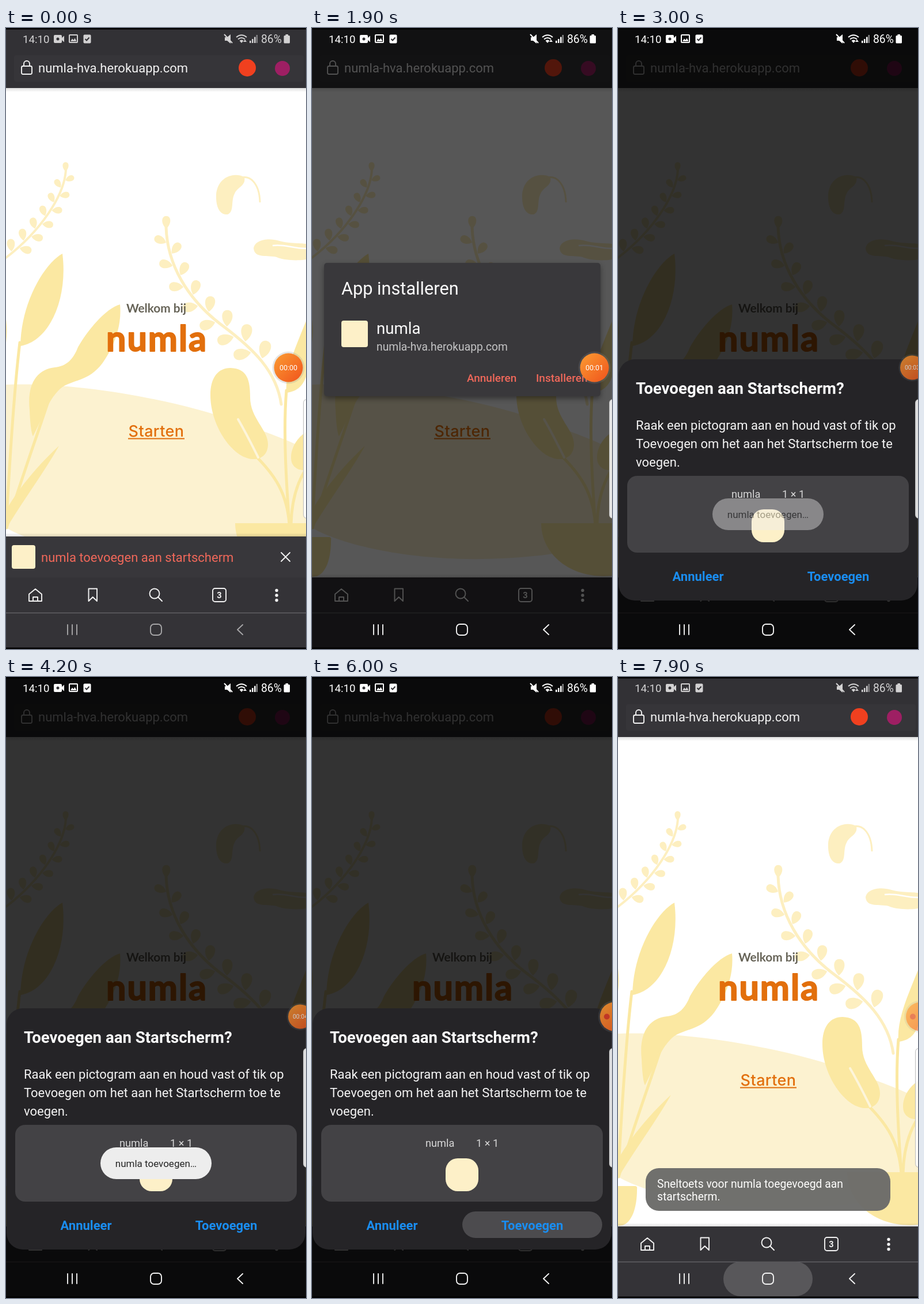
These frames come from a looping animation (521x1076 px, 8 s). An HTML page:

```html
<!DOCTYPE html>
<html lang="nl">
<head>
<meta charset="utf-8">
<title>App toevoegen</title>
<style>
  html, body { margin: 0; width: 100%; height: 100%; overflow: hidden; background: #000; }
  svg { display: block; width: 100%; height: 100%; }
  text { font-family: Roboto, Inter, sans-serif; white-space: pre; }
  .round { font-family: Lato, "Open Sans", sans-serif; }
  .plain { font-family: Inter, sans-serif; }
  .mid { text-anchor: middle; }
  .line { fill: none; stroke: #f2f2f2; stroke-width: 1.9; stroke-linejoin: round; stroke-linecap: round; }
  .stem { fill: none; stroke: #fbe8a2; stroke-linecap: round; stroke-width: 5; }
  .sprig { fill: none; stroke: #fdefc0; stroke-linecap: round; }
  #dialog > rect:first-child { filter: drop-shadow(0 4px 5px #0006); }
</style>
</head>
<body>
<svg viewBox="0 0 521 1076" preserveAspectRatio="none">
  <defs>
    <linearGradient id="orange" x1="0" y1="0" x2="1" y2="1">
      <stop offset="0" stop-color="#fb9c32"/><stop offset="1" stop-color="#f0531c"/>
    </linearGradient>
    <linearGradient id="shade" x1="0" y1="0" x2="0" y2="1">
      <stop offset="0" stop-color="#000" stop-opacity=".13"/><stop offset="1" stop-color="#000" stop-opacity="0"/>
    </linearGradient>
    <clipPath id="view"><rect y="104" width="521" height="848"/></clipPath>
  </defs>

  <g clip-path="url(#view)">
    <rect y="104" width="521" height="848" fill="#fff"/>
    <path fill="#fcf2d0" d="M0 618C130 613 300 646 400 682C450 699 490 714 521 730V880C480 904 420 914 330 919C190 926 60 900 0 866Z"/>
    <g fill="#fdefc0">
      <g id="leaflets"></g>
      <path id="leftSprig" class="sprig" stroke-width="4" d="M104 245C102 290 60 352 0 398"/>
      <path id="rightSprig" class="sprig" stroke-width="5" d="M278 345C280 410 315 470 375 515C430 556 470 595 478 652"/>
      <path d="M414 258C395 249 368 258 365 288C364 315 374 324 385 323C397 318 390 300 397 287C402 275 417 274 414 258Z"/>
      <path class="sprig" stroke-width="3" d="M402 262C425 250 440 272 441 301"/>
      <path d="M430 382C432 367 455 363 475 369C495 374 505 372 521 374V401C505 404 480 402 470 397C455 393 432 400 430 382Z"/>
      <path fill="none" stroke="#fff" stroke-width="2.5" d="M463 377C485 374 495 382 521 382"/>
    </g>
    <g fill="#fbe8a2">
      <path d="M98 391C68 407 26 474 25 551C75 543 108 470 98 391Z"/>
      <path d="M198 479C178 484 147 515 125 553C117 574 105 586 85 588C55 591 36 615 41 662C42 690 45 705 47 707C62 680 74 640 98 622C120 608 148 612 172 574C192 543 201 510 198 479Z"/>
      <path d="M92 724C55 758 20 800 0 836V868C30 818 66 770 92 724Z"/>
      <path d="M0 505Q3 525 0 545Z"/>
      <path d="M390 589C419 590 424 610 424 640C424 676 455 696 455 721C455 740 442 748 428 747C394 745 355 690 355 636C355 606 368 589 390 589Z"/>
      <path d="M521 508C505 548 484 592 487 632C505 630 516 620 521 604Z"/>
      <path d="M521 700C500 714 492 736 496 752C500 765 515 768 521 765Z"/>
      <path class="stem" d="M24 545C15 620 8 720 1 850M74 645C52 712 20 800 1 866"/>
      <path class="stem" d="M438 746C466 775 488 805 492 860M487 628C481 700 487 790 492 860M521 764C504 790 496 820 495 860"/>
      <path fill="none" stroke="#fdf5da" stroke-width="4" stroke-linecap="round" d="M403 678C416 700 428 724 438 744"/>
      <path d="M0 882H30Q34 882 33 888C33 920 24 945 8 950L0 951Z"/>
      <path d="M398 858H521V949C450 956 398 912 398 858Z"/>
    </g>
    <text class="round mid" x="261" y="493" font-size="20.8" font-weight="700" fill="#676458">Welkom bij</text>
    <text class="round mid" x="262" y="560" font-size="61" font-weight="700" letter-spacing="2" fill="#e26f0c" stroke="#e26f0c" stroke-width="2" stroke-linejoin="round">numla</text>
    <text class="plain mid" x="261" y="708" font-size="27" font-weight="500" letter-spacing=".4" fill="#e26f0c">Starten</text>
    <path stroke="#e26f0c" stroke-width="2" d="M212 711.5H310"/>
    <rect y="104" width="521" height="7" fill="url(#shade)"/>
    <rect y="-952" width="521" height="6" fill="url(#shade)" transform="scale(1 -1)"/>
    <g id="banner">
      <rect y="-881" width="521" height="6" fill="url(#shade)" transform="scale(1 -1)"/>
      <rect y="881" width="521" height="75" fill="#38373b"/>
      <rect x="10" y="896" width="41" height="41" rx="4" fill="#fdf0c8"/>
      <text x="61" y="925" font-size="22" fill="#f0685a">numla toevoegen aan startscherm</text>
      <path class="line" d="M478 909L493 924M493 909L478 924"/>
    </g>
  </g>

  <rect width="521" height="104" fill="#323135"/>
  <rect x="14" y="47" width="503" height="46" rx="4" fill="#363539"/>
  <rect y="952" width="521" height="124" fill="#343337"/>
  <path stroke="#626165" stroke-width="1.5" d="M0 1013.5H521"/>
  <rect x="27" y="66" width="18" height="14" rx="2.5" class="line"/>
  <path class="line" d="M31 66V62A5 5 0 0 1 41 62V66"/>
  <text x="56" y="77" font-size="22" fill="#f2f2f2">numla-hva.herokuapp.com</text>
  <circle cx="419" cy="69" r="15" fill="#f0401f"/>
  <circle cx="480" cy="70" r="13" fill="#9e1f63"/>
  <path class="line" d="M40 981L51 972L62 981V993H40ZM47 993V986H55V993M143.5 971.5H158V993L150.7 986L143.5 993ZM264 986L271 993"/>
  <circle cx="258" cy="980" r="8.5" class="line"/>
  <rect x="359" y="971" width="23" height="23" rx="4" class="line"/>
  <text class="mid" x="370.5" y="988" font-size="14.5" font-weight="700" fill="#f2f2f2">3</text>
  <path class="line" style="stroke-width:5.4" d="M470 974.5h0M470 983h0M470 991.5h0"/>

  <rect id="dim" width="521" height="1076"/>

  <g id="dialog">
    <rect x="21" y="407" width="480" height="231" rx="5" fill="#39383b"/>
    <text x="51" y="462" font-size="30.7" fill="#fafafa">App installeren</text>
    <rect x="51" y="507" width="46" height="46" rx="4" fill="#fdf0c8"/>
    <text x="112" y="530" font-size="27.7" fill="#fafafa">numla</text>
    <text x="112" y="559" font-size="19.3" fill="#c4c4c5">numla-hva.herokuapp.com</text>
    <g font-size="19" font-weight="500" fill="#f0685a">
      <text x="269" y="613">Annuleren</text><text x="389" y="613">Installeren</text>
    </g>
  </g>

  <g id="sheet">
    <rect x="1" y="574" width="519" height="418" rx="28" fill="#252427"/>
    <text x="31" y="634" font-size="27.6" font-weight="700" fill="#fafafa">Toevoegen aan Startscherm?</text>
    <g font-size="22" fill="#f4f4f4">
      <text x="31" y="696">Raak een pictogram aan en houd vast of tik op</text>
      <text x="31" y="728">Toevoegen om het aan het Startscherm toe te</text>
      <text x="31" y="760">voegen.</text>
    </g>
    <rect x="16" y="776" width="489" height="133" rx="17" fill="#434245"/>
    <g font-size="18.2" fill="#d8d8d8">
      <text x="197" y="814">numla</text><text x="285" y="814">1 × 1</text>
    </g>
    <rect x="232" y="834" width="57" height="57" rx="21" fill="#fdf0c8"/>
    <rect id="press" x="261" y="926" width="243" height="46" rx="23" fill="#4c4b4e"/>
    <g class="mid" font-size="22" font-weight="700" fill="#1a8df0">
      <text x="139" y="958">Annuleer</text><text x="382.5" y="958">Toevoegen</text>
    </g>
  </g>

  <g id="status" fill="#fff">
    <text x="29" y="26" font-size="18.7">14:10</text>
    <path d="M85 12H95Q97 12 97 14V17L101 13.5V24.5L97 21V24Q97 26 95 26H85Q83 26 83 24V14Q83 12 85 12Z"/>
    <circle cx="90" cy="19" r="2.5" fill="#323135"/>
    <rect x="110" y="12" width="14" height="13" rx="1" fill="none" stroke="#fff" stroke-width="2"/>
    <path d="M112 23L115 18.5L117.5 21L119.5 17.5L122.5 23Z"/>
    <rect x="134.5" y="11.5" width="13" height="15" rx="2"/>
    <path fill="none" stroke="#323135" stroke-width="2" d="M137.5 19L140 21.5L144.5 16.5"/>
    <path d="M380 16H384L390 11V27L384 22H380Z"/>
    <path stroke="#fff" stroke-width="2" d="M379 11L393 26"/>
    <path fill="none" stroke="#fff" stroke-width="2" d="M400 16Q409 8.5 418 16M403 19.5Q409 14.5 415 19.5"/>
    <path d="M405.5 22Q409 19 412.5 22L409 26ZM415 20L418 24H412ZM423 22h2.5v4h-2.5ZM427 19h2.5v7h-2.5ZM431 15.5h2.5v10.500h-2.5Z"/>
    <path opacity=".5" d="M434.5 12h2.5v14h-2.5Z"/>
    <text x="443" y="26" font-size="19.3">86%</text>
    <path d="M485.5 11H490V13H491.5Q493 13 493 14.5V25Q493 26.5 491.5 26.5H484Q482.5 26.5 482.5 25V14.5Q482.5 13 484 13H485.5Z"/>
  </g>
  <rect id="homePress" x="183" y="1013" width="155" height="60" rx="30" fill="#58575a"/>
  <g id="nav" class="line">
    <path d="M107 1034V1051M115 1034V1051M123 1034V1051M411 1034L402 1042.5L411 1051"/>
    <rect x="251" y="1033" width="19" height="19" rx="6"/>
  </g>

  <g id="adding">
    <rect x="164" y="815" width="193" height="55" rx="27.5" fill="#ededed"/>
    <text class="mid" x="260.5" y="849" font-size="17" fill="#252525">numla toevoegen…</text>
  </g>
  <g id="added">
    <rect x="48" y="851" width="425" height="74" rx="23" fill="#6c6c6a"/>
    <g font-size="19.3" fill="#fff">
      <text x="68" y="885">Sneltoets voor numla toegevoegd aan</text>
      <text x="68" y="907">startscherm.</text>
    </g>
  </g>

  <path d="M523 643.5Q516.5 643.5 516.5 650V843Q516.5 849.5 523 849.5Z" fill="#fff" fill-opacity=".85" stroke="#bbb"/>
  <g id="bubble">
    <circle r="28" fill="#888" opacity=".22"/>
    <circle r="25" fill="url(#orange)"/>
    <text id="clock" class="mid" y="4.5" font-size="12.5" fill="#fff"></text>
    <circle id="dot" cx="-13" r="5" fill="#dc3a26"/>
  </g>
  <path d="M0 0H521V2.5H0ZM0 1073.5H521V1076H0Z"/>
</svg>
<script>
const $ = id => document.getElementById(id);
const LOOP = 8000;

const ramp = (t, a, b) => Math.min(1, Math.max(0, (t - a) / (b - a)));
const easeOut = p => 1 - (1 - p) ** 3;
// rises from 0 to 1 over a..b and falls back over c..d
const pulse = (t, a, b, c, d) => ramp(t, a, b) - ramp(t, c, d);

const fade = (id, o) => {
  $(id).setAttribute("opacity", o);
  $(id).setAttribute("visibility", o > 0 ? "visible" : "hidden");
};
const move = (id, x, y, s = 1) => $(id).setAttribute("transform", `translate(${x} ${y}) scale(${s})`);

const leaflet = (p, angle, size) =>
  `<path d="M0 10C-9 2-8-10 0-10S9 2 0 10" transform="translate(${p.x} ${p.y}) rotate(${angle}) scale(${size}) translate(0 -13)"/>`;

// a leaflet on the tip, then alternating sides down the stem, growing on the way
function growLeaflets(id, count, gap, side, small, large) {
  const stem = $(id);
  let leaves = leaflet(stem.getPointAtLength(6), 0, small);
  for (let i = 0; i < count; i++, side = -side) {
    const d = gap * (i + 1.4);
    const p = stem.getPointAtLength(d), q = stem.getPointAtLength(d - 2);
    const up = Math.atan2(q.x - p.x, p.y - q.y) * 180 / Math.PI;
    leaves += leaflet(p, up + 55 * side, small + (large - small) * i / count);
  }
  $("leaflets").innerHTML += leaves;
}
growLeaflets("leftSprig", 12, 14.3, 1, .8, 1.1);
growLeaflets("rightSprig", 14, 20.5, -1, 1.1, 1.6);

function draw(t) {
  const dim = .66 * pulse(t, 550, 800, 2300, 2640) + .8 * pulse(t, 2650, 3000, 6100, 6400);
  fade("dim", dim);
  move("banner", 0, 80 * ramp(t, 700, 1100) ** 2);

  const scale = .92 + .08 * easeOut(ramp(t, 550, 780));
  move("dialog", 261 * (1 - scale), 522 * (1 - scale), scale);
  fade("dialog", pulse(t, 550, 780, 2250, 2450));

  const shown = easeOut(ramp(t, 2650, 3000)) - ramp(t, 6100, 6380) ** 2;
  move("sheet", 0, 502 * (1 - shown));
  fade("sheet", shown > 0 ? 1 : 0);
  fade("press", ramp(t, 5750, 5950));
  fade("adding", pulse(t, 2900, 3150, 4800, 5050));
  fade("added", .97 * ramp(t, 6250, 6550));

  const home = ramp(t, 7650, 7850);
  const lit = Math.min(1, dim / .6);
  fade("homePress", home);
  fade("nav", .6 + .4 * Math.max(lit, home));
  fade("status", .78 + .22 * lit);

  // the recorder bubble idles at the edge, then docks halfway off it
  const idle = ramp(t, 1900, 2200), dock = ramp(t, 5000, 5300);
  move("bubble", 490.5 + 20.5 * idle + 14 * dock, 588.5, 1 - .16 * (idle - dock));
  fade("bubble", 1 - .23 * idle + .08 * dock - .25 * ramp(t, 6050, 6400));
  $("clock").textContent = dock < .5 ? "00:0" + Math.floor(t / 1000) : "";
  fade("dot", dock < .5 ? 0 : 1);
}

const start = performance.now();
function tick() {
  draw((performance.now() - start) % LOOP);
  requestAnimationFrame(tick);
}
tick();
</script>
</body>
</html>
```
